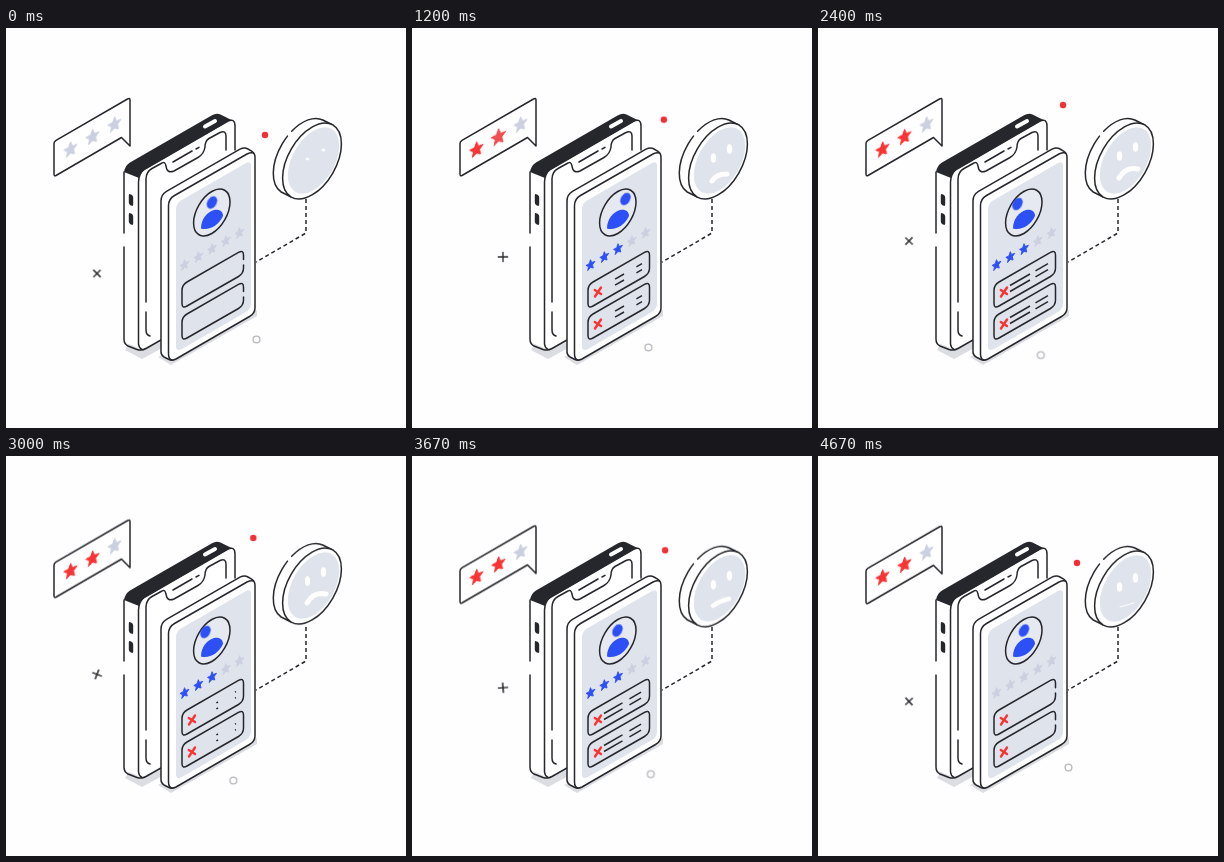
These frames come from a looping animation (400 px wide and 400 px high, 4.74 s). An HTML page without scripts:

```html
<!DOCTYPE html>
<html lang="en">
<head>
<meta charset="utf-8">
<title>App rating</title>
<style>
  :root { --ink: #26272c; --pale: #dfe3eb; --star: #cbd0e0; --blue: #2c50f6; --red: #f83434; --loop: 4.74s; }
  html, body { margin: 0; width: 100%; height: 100%; overflow: hidden; background: #fefdff; }
  svg { display: block; width: 100%; height: 100%; }
  .line { fill: none; stroke: var(--ink); stroke-width: 1.5; stroke-linecap: round; stroke-linejoin: round; }
  .white { fill: #fff; }
  .pale { fill: var(--pale); }
  .ink { fill: var(--ink); }
  .blue { fill: var(--blue); }
  .shadow { fill: #dcdde2; }
  .move { animation: var(--loop) infinite; transform-box: fill-box; transform-origin: center; }

  /* Drifting accents: one sine sweep out and back */
  .drift { animation: drift calc(var(--loop) / 2) cubic-bezier(.364, 0, .636, 1) infinite alternate; }
  @keyframes drift { to { transform: translate(var(--dx), var(--dy)); } }
  .spin { animation: spin var(--loop) linear infinite; }
  @keyframes spin { from { transform: rotate(45deg); } to { transform: rotate(-135deg); } }

  .bob { animation: bob calc(var(--loop) / 8) cubic-bezier(.364, 0, .636, 1) infinite alternate; }
  @keyframes bob { to { transform: translateY(var(--rise)); } }

  .star { fill: var(--star); stroke: var(--star); stroke-width: .16; stroke-linejoin: round; }
  .rate1 { animation-name: rate1; }
  .rate2 { animation-name: rate2; }
  .rate3 { animation-name: rate3; }
  @keyframes rate1 { 0%, 8% { fill: var(--star); stroke: var(--star); } 12%, 88% { fill: var(--blue); stroke: var(--blue); } 94%, 100% { fill: var(--star); stroke: var(--star); } }
  @keyframes rate2 { 0%, 11.5% { fill: var(--star); stroke: var(--star); } 15.5%, 87% { fill: var(--blue); stroke: var(--blue); } 93%, 100% { fill: var(--star); stroke: var(--star); } }
  @keyframes rate3 { 0%, 15% { fill: var(--star); stroke: var(--star); } 19%, 86% { fill: var(--blue); stroke: var(--blue); } 92%, 100% { fill: var(--star); stroke: var(--star); } }
  .warn1 { animation-name: warn1; }
  .warn2 { animation-name: warn2; }
  @keyframes warn1 { 0%, 18% { fill: var(--star); stroke: var(--star); transform: none; } 22% { transform: scale(1.15); } 23%, 100% { fill: var(--red); stroke: var(--red); } 27%, 100% { transform: none; } }
  @keyframes warn2 { 0%, 23% { fill: var(--star); stroke: var(--star); transform: none; } 26% { transform: scale(1.1); } 27.5%, 100% { fill: var(--red); stroke: var(--red); } 31%, 100% { transform: none; } }

  .cross { fill: none; stroke: var(--red); stroke-width: 2.4; stroke-linecap: round; animation-name: pop; }
  @keyframes pop { 0%, 6% { transform: scale(0); opacity: 0; } 7% { opacity: 1; } 12% { transform: scale(1.25); } 18%, 100% { transform: none; opacity: 1; } }

  .text { fill: none; stroke: var(--ink); stroke-width: 1.5; stroke-dasharray: 1 3; animation: write calc(var(--loop) / 3) linear infinite; }
  @keyframes write { 0% { stroke-dashoffset: 1; } 35%, 55% { stroke-dashoffset: 0; } 93%, 100% { stroke-dashoffset: -1; } }
  .field { stroke-dasharray: 1 1; animation: close var(--loop) infinite; }
  @keyframes close { 0%, 100% { stroke-dashoffset: .03; } 10%, 90% { stroke-dashoffset: 0; } }

  .head { animation: nod var(--loop) ease-in-out infinite; }
  @keyframes nod {
    0%, 4%, 100% { transform: none; }
    12.7% { transform: translate(6px, -3px); }
    19%, 25% { transform: translate(7.5px, -3.5px); }
    38% { transform: translate(-1px, 0); }
    50%, 63% { transform: translate(-6.5px, 1.5px); }
    77%, 90% { transform: translate(-.5px, 0); }
  }

  .eyes { animation: eyes var(--loop) ease-in-out infinite; }
  @keyframes eyes { 0%, 100% { transform: translateY(3px); } 12%, 25% { transform: translateY(2px); } 38%, 63% { transform: none; } 77% { transform: translateY(1px); } }
  .eye { animation-name: open; }
  @keyframes open { 0% { transform: scale(.7, .25); } 9%, 100% { transform: none; } }
  .mouth { fill: none; stroke: #fff; stroke-linecap: round; animation: frown var(--loop) ease-in-out infinite; }
  @keyframes frown {
    0%, 3% { d: path("M302 151Q309 148 316 146"); stroke-width: 1px; opacity: 0; }
    12.7%, 25% { d: path("M300 153Q304 146 315 146"); stroke-width: 5px; opacity: 1; }
    38%, 63% { d: path("M301 150Q308 138 320 141"); stroke-width: 5px; opacity: 1; }
    77% { d: path("M301 150Q308 145 317 143"); stroke-width: 4.5px; opacity: 1; }
    98.5% { d: path("M302 151Q309 149 316 147"); stroke-width: 1px; opacity: 1; }
    100% { d: path("M302 151Q309 149 316 147"); stroke-width: 1px; opacity: 0; }
  }
</style>
</head>
<body>
<svg viewBox="0 0 400 400">
  <defs>
    <path id="star" d="M0-1 .27-.37 .95-.31 .43.14 .59.81 0 .46-.59.81-.43.14-.95-.31-.27-.37Z"/>
    <path id="field" pathLength="1" d="M237.500 237V240Q237.500 245.500 232.500 248.500L181 278Q176 281 176 275.500V262.500Q176 257 181 254L232.500 224.400Q237.500 221.500 237.500 227V237"/>
    <path id="cross" d="M182.800 262 189 266M189 259.500 183 268.500"/>
    <path id="long" pathLength="1" d="M192 257.500 212 246"/>
    <path id="short" pathLength="1" d="M217.500 242.800 230 235.600"/>
  </defs>

  <!-- Speech bubble -->
  <g class="bob" style="--rise:-6.500px">
    <path class="line" style="fill:#fff" d="M50 112.300 121.500 71Q124 69.500 124 72V118L115.500 109.500 50 147.500Q48 148.500 48 146V115.500Q48 113.500 50 112.300Z"/>
    <g transform="translate(64.500 121.500) matrix(6.700 -2.900 0 7.300 0 0)"><use href="#star" class="star move warn1"/></g>
    <g transform="translate(86.500 109) matrix(6.700 -2.900 0 7.300 0 0)"><use href="#star" class="star move warn2"/></g>
    <g transform="translate(108.500 96.500) matrix(6.700 -2.900 0 7.300 0 0)"><use href="#star" class="star"/></g>
  </g>

  <!-- Shadows -->
  <path class="shadow" d="M119 322 136 331 158 319V308H127Z"/>
  <path class="shadow" d="M152 329 165 337 251 288V282Z"/>

  <!-- Phone -->
  <path class="white" d="M118 145 215 87 229 96V280L137 322 118 314Z"/>
  <path class="ink" d="M118 144Q119 137.500 124 134.500L206 87.200Q210.500 84.500 214.500 86.500L227.500 93Q225 92 222 93.500L139 141.500Q134.500 144 133 150Z"/>
  <path d="M199 98.500 209 93" fill="none" stroke="#fff" stroke-width="4" stroke-linecap="round"/>
  <g class="line">
    <path d="M118 144V205M118 219V311Q118 316 122 318L131 321.500Q136 323 140 320.500L155 312"/>
    <path d="M132.500 316V154Q133 145 139 141L222 93Q229 90 229 98V122M132.500 316Q133 320 136 321.500"/>
    <path d="M144 308Q140 307 140 302V284M140 274V151Q140 144 146 140.500L156 135Q159 133 160 138Q161 146 168 143L192 129.500Q198 126 199 119Q199 113 203 110.500L214 104.500Q220 102 220 108V122M167 134 186 123M190 121 193 119.300"/>
  </g>
  <g class="ink">
    <rect x="-2.200" y="-5.500" width="4.400" height="11" rx="2" transform="translate(125 172) skewY(25)"/>
    <rect x="-2.200" y="-5.500" width="4.400" height="11" rx="2" transform="translate(125 191) skewY(25)"/>
  </g>

  <!-- Card -->
  <path class="line" style="fill:#fff" d="M155 324V173Q155 166.500 160.500 163.300L234 121.200Q238.500 118.800 242 121L246 123.300Q249 125 249 129.500V280Q249 285.500 243.500 288.500L170 331Q166 333 163 331.500L158 329Q155 327 155 324Z"/>
  <path class="line" d="M166 332Q162.500 331 162.500 326V177.500Q162.500 171 168.500 167.500L241 126Q245 124 247.500 125"/>
  <path class="pale" d="M170 181.500Q170 175.500 175 172.500L240 135Q245 132.500 245 138V275.500Q245 281 240 284L176 321Q170 324 170 318Z"/>
  <ellipse class="line" style="fill:#e6e9f0" rx="14.900" ry="25.700" transform="translate(205.800 184.500) rotate(30)"/>
  <g class="blue">
    <g class="head"><ellipse rx="4.600" ry="6.800" transform="translate(206 174.500) rotate(30)"/></g>
    <path d="M195 200.500C195 191 201 184 208 182C214 181 217 184 217 188C213 197 203 203 195 200.500Z"/>
  </g>
  <g transform="translate(178.500 237) matrix(4.700 -2.200 0 5.300 0 0)"><use href="#star" class="star move rate1"/></g>
  <g transform="translate(192.300 229) matrix(4.700 -2.200 0 5.300 0 0)"><use href="#star" class="star move rate2"/></g>
  <g transform="translate(206 221) matrix(4.700 -2.200 0 5.300 0 0)"><use href="#star" class="star move rate3"/></g>
  <g transform="translate(219.800 213) matrix(4.700 -2.200 0 5.300 0 0)"><use href="#star" class="star"/></g>
  <g transform="translate(233.500 205) matrix(4.700 -2.200 0 5.300 0 0)"><use href="#star" class="star"/></g>
  <g>
    <use href="#field" class="line field"/>
    <use href="#cross" class="cross move"/>
    <use href="#long" class="text"/>
    <use href="#long" class="text" y="6"/>
    <use href="#short" class="text"/>
    <use href="#short" class="text" y="6"/>
  </g>
  <g transform="translate(0 32)">
    <use href="#field" class="line field"/>
    <use href="#cross" class="cross move"/>
    <use href="#long" class="text"/>
    <use href="#long" class="text" y="6"/>
    <use href="#short" class="text"/>
    <use href="#short" class="text" y="6"/>
  </g>

  <!-- Face token -->
  <path class="line" stroke-dasharray="4 3" style="stroke-linecap:butt" d="M300 171V205L250 234"/>
  <g class="bob" style="--rise:-3px">
    <path class="white" d="M285.200 169 275.200 164A24 41.600 30 0 1 316.800 92L326.800 97Z"/>
    <path class="line" pathLength="100" stroke-dasharray="58 5 60" d="M285.200 169 275.200 164A24 41.600 30 0 1 316.800 92L326.800 97"/>
    <ellipse class="line" style="fill:#fff" rx="24" ry="41.600" transform="translate(306 133) rotate(30)"/>
    <ellipse class="pale" rx="21" ry="36.300" transform="translate(307.500 132.500) rotate(30)"/>
    <g class="eyes white">
      <ellipse class="eye move" cx="301.500" cy="128" rx="2.700" ry="4.800"/>
      <ellipse class="eye move" cx="317.500" cy="119" rx="2.700" ry="4.800"/>
    </g>
    <path class="mouth" d="M302 151Q309 148 316 146"/>
  </g>

  <!-- Accents -->
  <circle class="drift" style="--dx:-14px;--dy:-30px" cx="259" cy="107" r="3.200" fill="#f22f35"/>
  <circle class="drift" style="--dx:-27.700px;--dy:15.600px" cx="250.500" cy="311.500" r="3.400" fill="none" stroke="#b9bbc2" stroke-width="1.400"/>
  <g class="drift" style="--dx:0px;--dy:-32.500px">
    <g transform="translate(91 245.500)"><path class="line spin" style="stroke-width:1.300" d="M-4.700 0H4.700M0-4.700V4.700"/></g>
  </g>
</svg>
</body>
</html>
```
